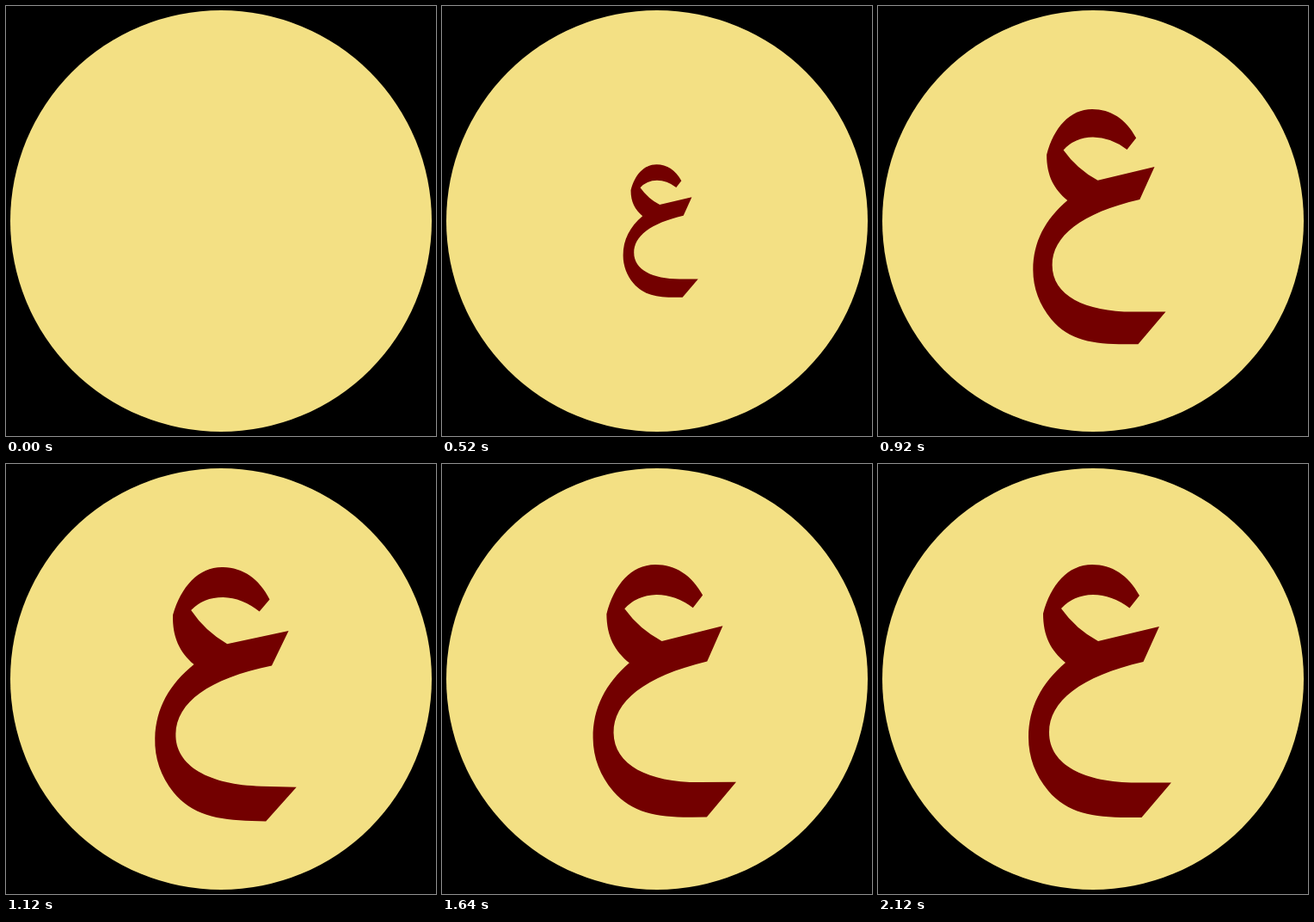
Write an HTML page that moves like this. It is 500 px wide and 500 px high and loops after 2.8 s.

```html
<!DOCTYPE html>
<html lang="ar">
<head>
<meta charset="utf-8">
<title>Letter ain</title>
<style>
  html, body { margin: 0; width: 100%; height: 100%; overflow: hidden; background: #000; }
  svg { display: block; width: 100vw; height: 100vh; }
</style>
</head>
<body>
<svg viewBox="0 0 500 500">
  <circle cx="250" cy="250" r="245" fill="#f3e084"/>
  <path id="letter" fill="#730000" d="M304 153L292.5 167.5Q272 152 250 152Q227 152.5 213 168
    Q230 192 256 206L327 189L308.5 230C235 247 199 276 199 312C199 350 240 370.5 300 370.5
    L341 370.5L306.5 411L290 411C250 411 220 406 198 380C183 362 175 341 175 318
    C175 283 190 255 218 231C201 217 192 200 192 174C201 140 221 117 249 117C272 117 291 129 304 153Z"/>
</svg>
<script>
const LOOP = 2800, STEP = 40, CENTER = 250;
const letter = document.getElementById('letter');

// Tilt in degrees at each time in ms
const tiltKeys = [[1040, 0], [1260, 5.2], [1480, -0.5], [1620, -0.5], [2120, 0]];

function tilt(ms) {
  if (ms <= tiltKeys[0][0]) return 0;
  for (let i = 1; i < tiltKeys.length; i++) {
    const [t0, a] = tiltKeys[i - 1], [t1, b] = tiltKeys[i];
    if (ms < t1) return a + (b - a) * (1 - Math.cos(Math.PI * (ms - t0) / (t1 - t0))) / 2;
  }
  return 0;
}

// Falls at constant speed, then springs around the resting place
function drop(ms) {
  const speed = 489, landing = 0.511, omega = 4 * Math.PI;
  const t = ms / 1000 - landing;
  if (t < 0) return speed * t;
  return t < 1 ? speed / omega * Math.exp(-4.2 * t) * Math.sin(omega * t) : 0;
}

function draw(ms) {
  const scale = Math.min(1, ms / 990);
  letter.setAttribute('transform',
    `translate(${CENTER} ${CENTER + drop(ms)}) rotate(${tilt(ms)}) scale(${scale}) translate(${-CENTER} ${-CENTER})`);
  letter.setAttribute('visibility', ms > 0 ? 'visible' : 'hidden');
}

const start = performance.now();
function tick() {
  const ms = (performance.now() - start) % LOOP;
  draw(Math.floor(ms / STEP) * STEP);
  requestAnimationFrame(tick);
}
tick();
</script>
</body>
</html>
```
